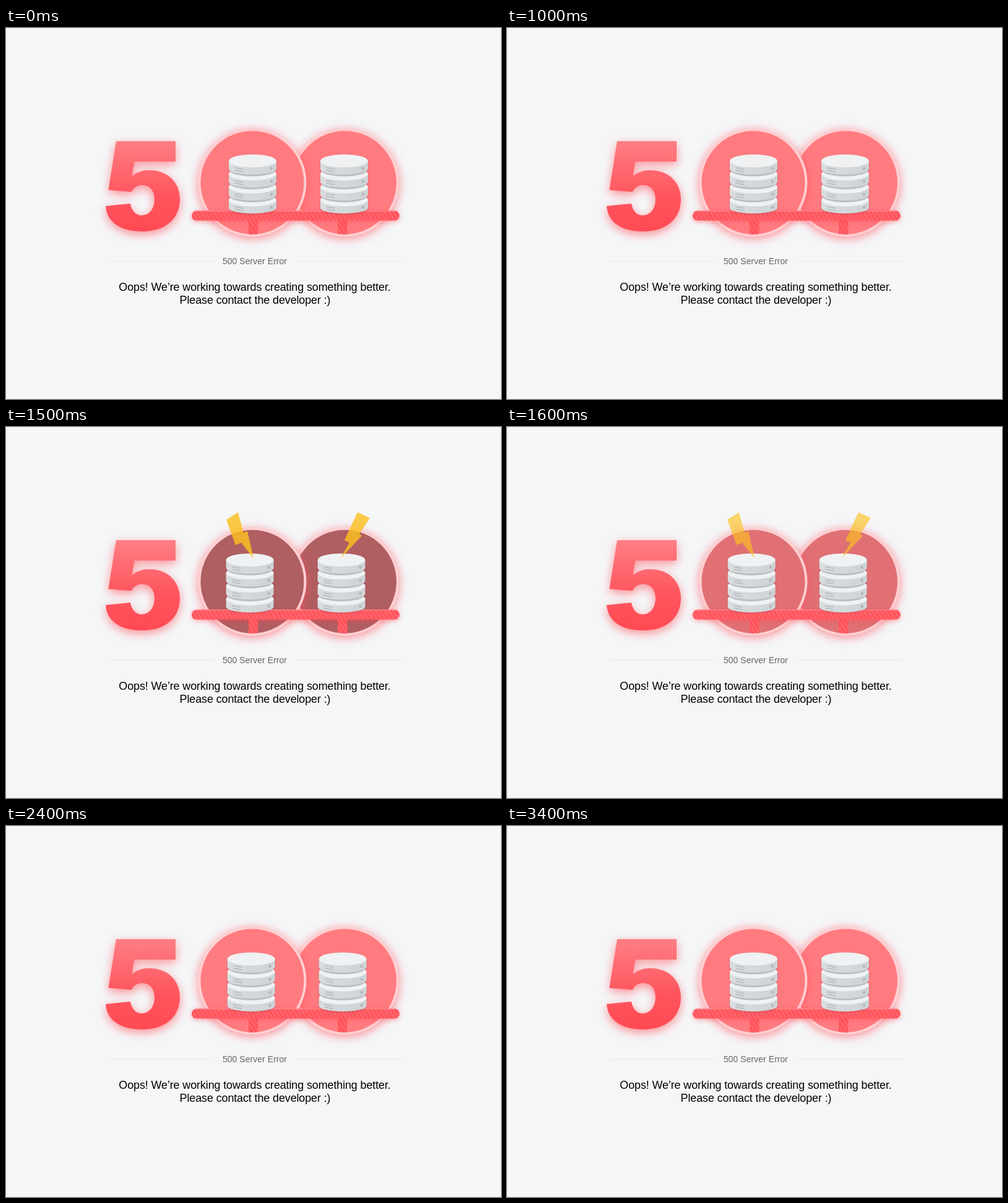
An HTML page that plays this animation: 800 by 600 pixels, repeating every 3500 ms.

```html
<!DOCTYPE html>
<html lang="en">
<head>
<meta charset="utf-8">
<title>500 Server Error</title>
<style>
  html, body { margin: 0; width: 100%; height: 100%; overflow: hidden; background: #f5f6f8; }
  svg { display: block; width: 800px; height: 600px; }
  text { font-family: "Liberation Sans", Arial, sans-serif; text-anchor: middle; }
  .label { font-size: 14px; letter-spacing: .04px; fill: #666; }
  .message { font-size: 18px; letter-spacing: -.14px; fill: #000; }
  .five { filter: drop-shadow(0 5px 8px rgba(255, 75, 85, .6)); }
  .disc { fill: #ff7b80; stroke: #ffcfd2; stroke-width: 4; filter: drop-shadow(0 3px 8px rgba(255, 80, 90, .65)); }
  .board { filter: drop-shadow(0 2px 4px rgba(255, 70, 80, .45)); }
  .stack { filter: drop-shadow(0 1px 1px rgba(130, 50, 60, .35)); }
  .bolt { fill: #fcc021; opacity: 0; }
</style>
</head>
<body>
<svg viewBox="0 0 800 600">
  <defs>
    <linearGradient id="red" x2="0" y2="1">
      <stop offset="0" stop-color="#ff7e84"/>
      <stop offset=".6" stop-color="#ff555e"/>
      <stop offset="1" stop-color="#ff4a53"/>
    </linearGradient>
    <linearGradient id="side">
      <stop offset="0" stop-color="#d9dddf"/>
      <stop offset="1" stop-color="#ced3d6"/>
    </linearGradient>
    <pattern id="stripes" width="6" height="6" patternUnits="userSpaceOnUse" patternTransform="rotate(-32)">
      <rect width="6" height="6" fill="#ff535c"/>
      <rect width="3" height="6" fill="#ff646b"/>
    </pattern>
    <clipPath id="discs">
      <circle cx="398" cy="250" r="84"/>
      <circle cx="547.5" cy="250" r="84"/>
    </clipPath>
    <g id="unit">
      <path d="M-38.5 0V13A38.5 9 0 0 0 38.5 13V0Z" fill="url(#side)"/>
      <ellipse rx="38.5" ry="10.5" fill="#f0f1f2"/>
      <path d="M-29 11l14 2.5M-29 15l14 2.5" stroke="#b3babf" stroke-width="1.5"/>
      <circle cx="30.5" cy="12" r="2.3" fill="#b0b7bc"/>
    </g>
    <g id="server" class="stack"></g>
  </defs>

  <path class="five" fill="url(#red)" d="M178 183H274V216H207.500L203.500 240C211 233 221 230 231 230C261 230 281 249 281 277C281 309 257 329 220 329C185 329 163 314 161 288L201 284C203 296 210 303 219 303C232 303 240 292 240 277C240 263 232 254 220 254C212 254 206 258 203 265L165.500 262Z"/>

  <circle class="disc" cx="547.5" cy="250" r="85.5"/>
  <circle class="disc" cx="398" cy="250" r="85.5"/>
  <path clip-path="url(#discs)" fill="url(#stripes)" d="M392 310h15.500v26h-15.500zM536 310h15.500v26h-15.500z"/>
  <g class="board">
    <rect x="300" y="295.500" width="336" height="16" rx="8" fill="url(#stripes)"/>
    <path d="M307 296H629" stroke="#ff969b"/>
  </g>

  <g id="servers">
    <use href="#server" x="398.500"/>
    <use href="#server" x="546.500"/>
  </g>

  <path class="bolt" d="M356 150L375 138L384 171L390 168L400 212L380 187L371 191Z"/>
  <path class="bolt" d="M568 138L588 147L571 173L575 176L541 212L555 187L547 183Z"/>

  <path d="M165 377.500H335M469 377.500H640" stroke="#e5e7ea"/>
  <text class="label" x="402" y="382">500 Server Error</text>
  <text class="message" x="402" y="425">Oops! We’re working towards creating something better.</text>
  <text class="message" x="402.500" y="446">Please contact the developer :)</text>
</svg>
<script>
const LOOP = 3500, STEP = 100;
// [time in ms, value]
const SHAKE = [[1275, 0], [1502, -4.4], [1922, 3.9], [2377, -2.3], [2797, 1.5], [3025, 0]];
const DARK = [[1299, 0], [1300, 1], [1600, .17], [1800, 0]];
const FLASH = [[1299, 0], [1300, 1], [1400, 1], [1600, .65], [1800, 0]];
const LIT = [255, 123, 128], DIM = [75, 58, 59];

const linear = p => p;
const easeInOut = p => p * p * (3 - 2 * p);
const mix = (a, b, p) => a + (b - a) * p;

function sample(keys, t, ease) {
  const next = keys.findIndex(k => k[0] > t);
  if (next < 1) return keys[next ? keys.length - 1 : 0][1];
  const [t0, a] = keys[next - 1], [t1, b] = keys[next];
  return mix(a, b, ease((t - t0) / (t1 - t0)));
}

// Stack the units bottom-up, each casting a shade on the one below.
let stack = "";
for (let i = 3; i >= 0; i--) {
  const y = 215 + i * 21;
  if (i < 3) stack += `<path d="M-36 ${y + 9}V${y + 16}A36 9 0 0 0 36 ${y + 16}V${y + 9}Z" fill="#b9bfc3"/>`;
  stack += `<use href="#unit" y="${y}"/>`;
}
document.getElementById("server").innerHTML = stack;

const servers = document.getElementById("servers");
const discs = document.querySelectorAll(".disc");
const bolts = document.querySelectorAll(".bolt");

function draw(now) {
  const t = Math.floor(now % LOOP / STEP) * STEP;
  const dark = sample(DARK, t, linear);
  const color = LIT.map((c, i) => Math.round(mix(c, DIM[i], dark)));
  servers.setAttribute("transform", `translate(${sample(SHAKE, t, easeInOut)})`);
  discs.forEach(d => d.style.fill = `rgb(${color})`);
  bolts.forEach(b => b.style.opacity = sample(FLASH, t, linear));
}

const start = performance.now();
function tick() {
  draw(performance.now() - start);
  requestAnimationFrame(tick);
}
tick();
</script>
</body>
</html>
```
